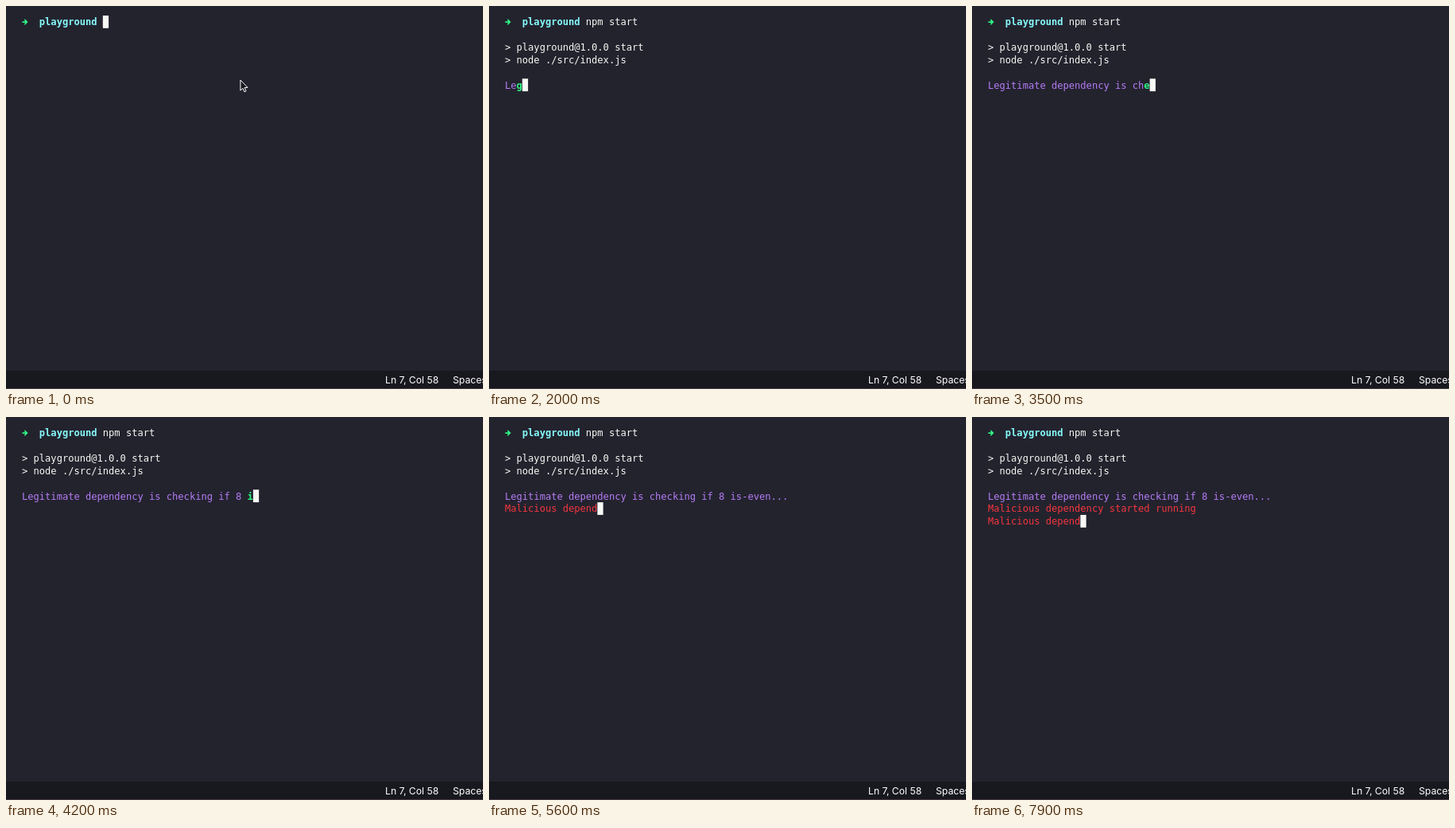
An HTML page that plays this animation: 600x481 px, repeating every 8 s.

```html
<!DOCTYPE html>
<html lang="en">
<head>
<meta charset="utf-8">
<title>Terminal</title>
<style>
  html, body { margin: 0; width: 100%; height: 100%; overflow: hidden; background: #23232e; }
  svg { display: block; width: 600px; height: 481px; }
  text { white-space: pre; fill: #f8f8f4; }
  .mono { font: 12.08px "DejaVu Sans Mono", monospace; }
  .status { font: 12.2px Inter, "Open Sans", sans-serif; fill: #fff; }
  .dir { fill: #86f9fa; font-weight: bold; }
  .legit { fill: #b57cf5; }
  .fresh { fill: #2ff582; font-weight: bold; }
  .bad { fill: #f5363f; }
</style>
</head>
<body>
<svg viewBox="0 0 600 481">
  <rect width="600" height="481" fill="#23232e"/>
  <path d="M20.5 19.2h3.4l-1-2.4h1.3l3.4 3.3-3.4 3.3h-1.3l1-2.4h-3.4z" fill="#2ff582"/>
  <g id="term" class="mono"></g>
  <rect id="cursor" fill="#f8f8f4"/>
  <path id="pointer" d="M294.9 93v13.1l3-2.8 2 4.5 2.1-.9-1.9-4.4h3.9z"
        fill="#17171d" stroke="#fff" stroke-linejoin="round"/>
  <rect y="458" width="600" height="23" fill="#18181f"/>
  <rect y="480" width="600" height="1" fill="#43363f"/>
  <text class="status" x="477" y="474">Ln 7, Col 58</text>
  <text class="status" x="562" y="474">Spaces: 4</text>
</svg>
<script>
const LOOP = 8000, STEP = 100;
const LEFT = 20, TOP = 12, COL = 7.272, ROW = 15.85, BASE = 12.3;
const COMMAND = "npm start";
const COMMAND_COL = 14;
const LINES = [
  "Legitimate dependency is checking if 8 is-even...",
  "Malicious dependency started running",
  "Malicious dependency started running"
];
// [ms, characters printed], each line break counting as one
const PACE = [[1700, 0], [2000, 3], [2900, 16], [3300, 25], [4200, 40],
              [4700, 49], [5600, 66], [6600, 82], [6900, 86], [7800, 100], [7900, 103]];

const $ = id => document.getElementById(id);

function addText(row, col, cls, content = "") {
  const el = document.createElementNS("http://www.w3.org/2000/svg", "text");
  el.setAttribute("x", LEFT + col * COL);
  el.setAttribute("y", TOP + row * ROW + BASE);
  el.setAttribute("class", cls);
  el.textContent = content;
  $("term").append(el);
  return el;
}

addText(0, 3, "dir", "playground");
const command = addText(0, COMMAND_COL, "");
const header = [addText(2, 0, "", "> playground@1.0.0 start"),
                addText(3, 0, "", "> node ./src/index.js")];
const output = LINES.map((_, i) => addText(5 + i, 0, i ? "bad" : "legit"));
const fresh = addText(5, 0, "fresh");

function printedAt(t) {
  if (t <= PACE[0][0]) return 0;
  const i = PACE.findIndex(p => t <= p[0]);
  if (i < 0) return PACE[PACE.length - 1][1];
  const [t0, n0] = PACE[i - 1], [t1, n1] = PACE[i];
  return Math.floor(n0 + (n1 - n0) * (t - t0) / (t1 - t0) + 1e-6);
}

function placeCursor(row, col) {
  const box = { x: LEFT + col * COL, y: TOP + row * ROW, width: COL, height: ROW };
  for (const key in box) $("cursor").setAttribute(key, box[key]);
}

function draw(t) {
  const typed = Math.max(0, Math.min(COMMAND.length, (t - 600) / STEP * 3));
  const started = t >= 1600;
  command.textContent = COMMAND.slice(0, typed);
  $("pointer").style.display = t < 700 ? "" : "none";
  header.forEach(el => el.style.display = started ? "" : "none");

  let left = printedAt(t), row = 5, col = 0;
  fresh.textContent = "";
  LINES.forEach((line, i) => {
    const count = Math.max(0, Math.min(left, line.length));
    const typing = left >= 0 && left <= line.length;
    const greenTip = i === 0 && typing && count > 0;
    output[i].textContent = line.slice(0, greenTip ? count - 1 : count);
    if (greenTip) {
      fresh.textContent = line[count - 1];
      fresh.setAttribute("x", LEFT + (count - 1) * COL);
    }
    if (typing) {
      row = 5 + i;
      col = count;
    }
    left -= line.length + 1;
  });

  if (started) placeCursor(row, col);
  else if (t >= 1300) placeCursor(1, 0);
  else placeCursor(0, COMMAND_COL + typed);
}

const start = performance.now();
function tick() {
  const t = (performance.now() - start) % LOOP;
  draw(Math.floor(t / STEP) * STEP);
  requestAnimationFrame(tick);
}
tick();
</script>
</body>
</html>
```
